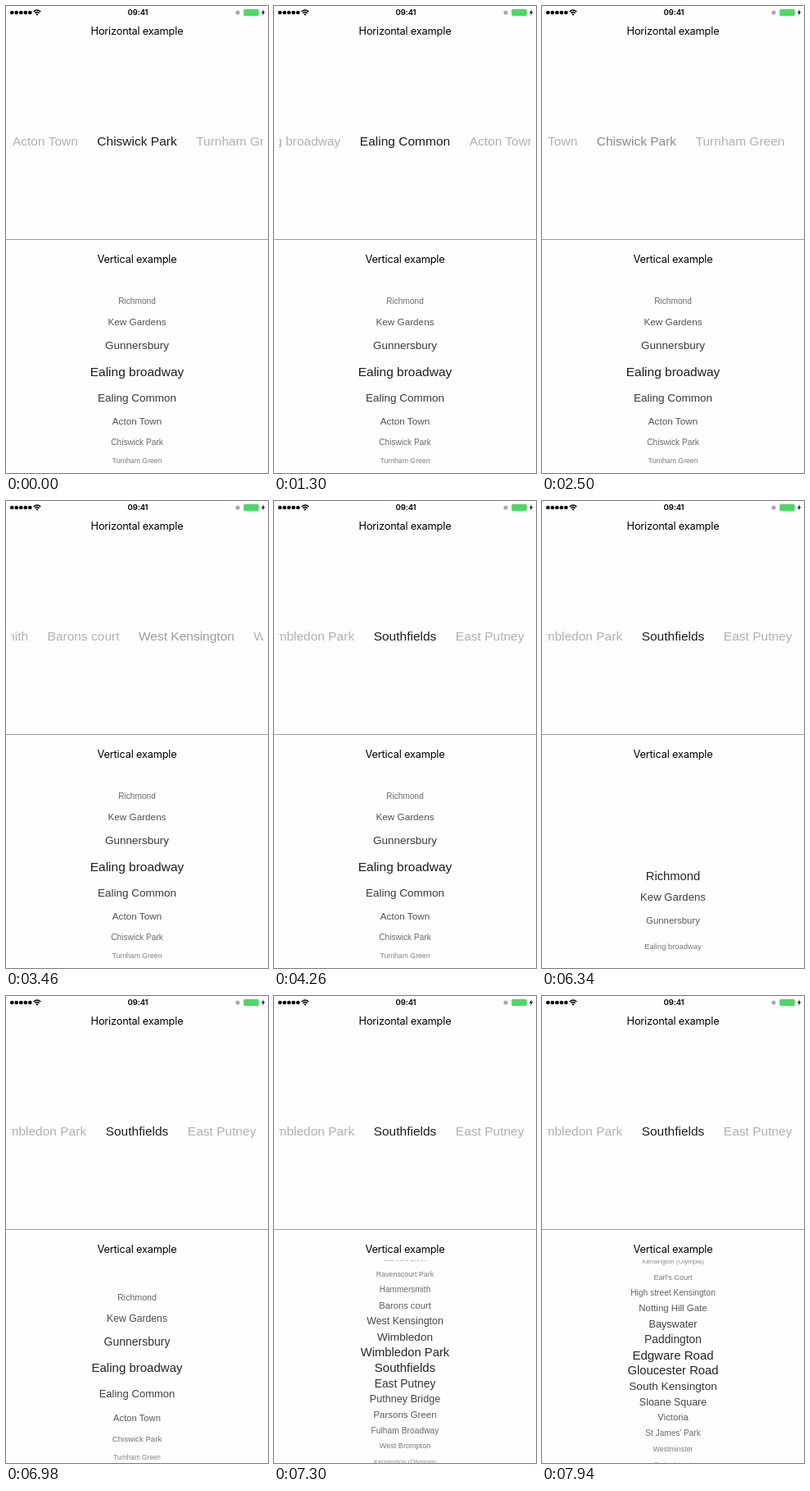
Animation of 320x569 px, one loop 8000 ms. Source, as an HTML page:

```html
<!DOCTYPE html>
<html lang="en">
<head>
<meta charset="utf-8">
<title>Picker examples</title>
<style>
  html, body { margin: 0; width: 100%; height: 100%; overflow: hidden; background: #fffdff; }
  #stage { position: relative; width: 320px; height: 569px; overflow: hidden; }
  #stage > * { position: absolute; }
  .title {
    left: 0; width: 320px; text-align: center; color: #000;
    font: 400 12.8px/20px Inter, "Liberation Sans", sans-serif; letter-spacing: -0.2px;
  }
  .time {
    left: 0; width: 322px; top: 2px; text-align: center; color: #000;
    font: 600 9.6px/12px Inter, "Liberation Sans", sans-serif; letter-spacing: -0.1px;
  }
  .rule { left: 0; top: 284px; width: 320px; height: 1px; background: #9c9b9e; }
  .picker { overflow: hidden; }
  .picker span {
    position: absolute; left: 0; top: 0; white-space: nowrap; color: #1c1c1c;
    font: 15.5px/20px "Liberation Sans", Arial, sans-serif;
  }
  #across { left: 6px; top: 150px; width: 308px; height: 30px; }
  #down { left: 0; top: 322px; width: 320px; height: 247px; }
</style>
</head>
<body>
<div id="stage">
  <svg width="320" height="18" style="left:0;top:0">
    <g id="signal"></g>
    <g fill="none" stroke="#000" stroke-width="1.4">
      <path d="M33.6 6.9Q38 2.9 42.4 6.9"/>
      <path d="M35.3 8.8Q38 6.3 40.7 8.8"/>
    </g>
    <path d="M36.4 10Q38 8.7 39.6 10L38 11.7Z"/>
    <circle cx="283" cy="8" r="2.6" fill="#a9a9ab"/>
    <rect x="290.2" y="3.7" width="18.6" height="8.4" rx="1.6" fill="#4cd964"/>
    <path d="M309.4 6.4q1.2 1.5 0 3z" fill="#4cd964"/>
    <path d="M314.8 4L312 8.6H313.9L313.1 12L316.1 7.3H314.2Z"/>
  </svg>
  <div class="time">09:41</div>
  <div class="title" style="top:21px">Horizontal example</div>
  <div id="across" class="picker"></div>
  <div class="rule"></div>
  <div class="title" style="top:298.5px">Vertical example</div>
  <div id="down" class="picker"></div>
</div>
<script>
const LOOP = 8000, TICK = 80, PHASE = 20;
const GAP = 23.5, GRAY = 176, INK = 28, REACH = 248;

const stops = `Richmond,Kew Gardens,Gunnersbury,Ealing broadway,Ealing Common,Acton Town,
Chiswick Park,Turnham Green,Stamford Brook,Ravenscourt Park,Hammersmith,Barons court,
West Kensington,Wimbledon,Wimbledon Park,Southfields,East Putney,Puthney Bridge,
Parsons Green,Fulham Broadway,West Brompton,Kensington (Olympia),Earl's Court,
High street Kensington,Notting Hill Gate,Bayswater,Paddington,Edgware Road,
Gloucester Road,South Kensington,Sloane Square,Victoria,St James' Park,Westminster,
Embankment,Temple`.split(",").map(s => s.trim());

const lerp = (a, b, k) => a + (b - a) * k;
const smooth = u => u * u * (3 - 2 * u);
const coast = u => 1 - (1 - u) ** 1.8;

// centres of the items, each found from the one before
function centres(step) {
  const list = [0];
  for (let i = 1; i < stops.length; i++) list.push(list[i - 1] + step(i - 1));
  return list;
}

function addLabels(id) {
  const box = document.getElementById(id);
  return stops.map(name => {
    const el = document.createElement("span");
    el.textContent = name;
    box.append(el);
    return el;
  });
}

const across = addLabels("across"), down = addLabels("down");
const widths = across.map(el => el.getBoundingClientRect().width);
const colX = centres(i => (widths[i] + widths[i + 1]) / 2 + GAP);
// rows near the initially selected one are taller
const rowY = centres(i => Math.max(19, 33.2 - 3 * Math.abs(i - 2.5)));

// swipes: start, end, target, easing
const acrossStart = 6; // in items
const acrossSwipes = [
  [420, 1300, 4, smooth],
  [1940, 2740, 7, smooth],
  [2900, 3926, 14.95, smooth],
  [4020, 4260, 15, smooth]
];
const downStart = rowY[3]; // in px
const downSwipes = [
  [4900, 5140, rowY[7] - 4, smooth],
  [5220, 5460, rowY[7], smooth],
  [5940, 6340, -11.5, smooth],
  [6340, 6820, 0, smooth],
  [6900, 7940, rowY[27] + 8, coast]
];

function valueAt(start, swipes, t) {
  return swipes.reduce((v, [t0, t1, to, ease]) =>
    t <= t0 ? v : lerp(v, to, ease(Math.min(1, (t - t0) / (t1 - t0)))), start);
}

document.getElementById("signal").innerHTML =
  [0, 1, 2, 3, 4].map(i => `<circle cx="${7.3 + i * 5.5}" cy="8" r="2.35"/>`).join("");

function drawAcross(index) {
  const i = Math.floor(index);
  const scroll = lerp(colX[i], colX[i + 1], index - i);
  across.forEach((el, n) => {
    const d = colX[n] - scroll;
    const far = Math.min(1, Math.abs(d) / ((widths[n] + GAP) / 2));
    const shade = Math.round(lerp(INK, GRAY, far));
    el.style.transform = `translate(${154 + d - widths[n] / 2}px, 5px)`;
    el.style.color = `rgb(${shade},${shade},${shade})`;
  });
}

function drawDown(scroll) {
  down.forEach((el, n) => {
    const d = rowY[n] - scroll;
    const size = Math.max(0, 1 - Math.abs(d) / REACH);
    el.style.visibility = Math.abs(d) < 140 ? "visible" : "hidden";
    el.style.transform = `translate(${160 - widths[n] / 2}px, ${113.7 + d}px) scale(${size})`;
    el.style.opacity = size;
  });
}

const start = performance.now();
function frame(now) {
  const t = Math.max(0, now - start) % LOOP;
  const held = Math.floor((t - PHASE) / TICK) * TICK + PHASE;
  drawAcross(valueAt(acrossStart, acrossSwipes, held));
  drawDown(valueAt(downStart, downSwipes, held));
  requestAnimationFrame(frame);
}
frame(start);
</script>
</body>
</html>
```
